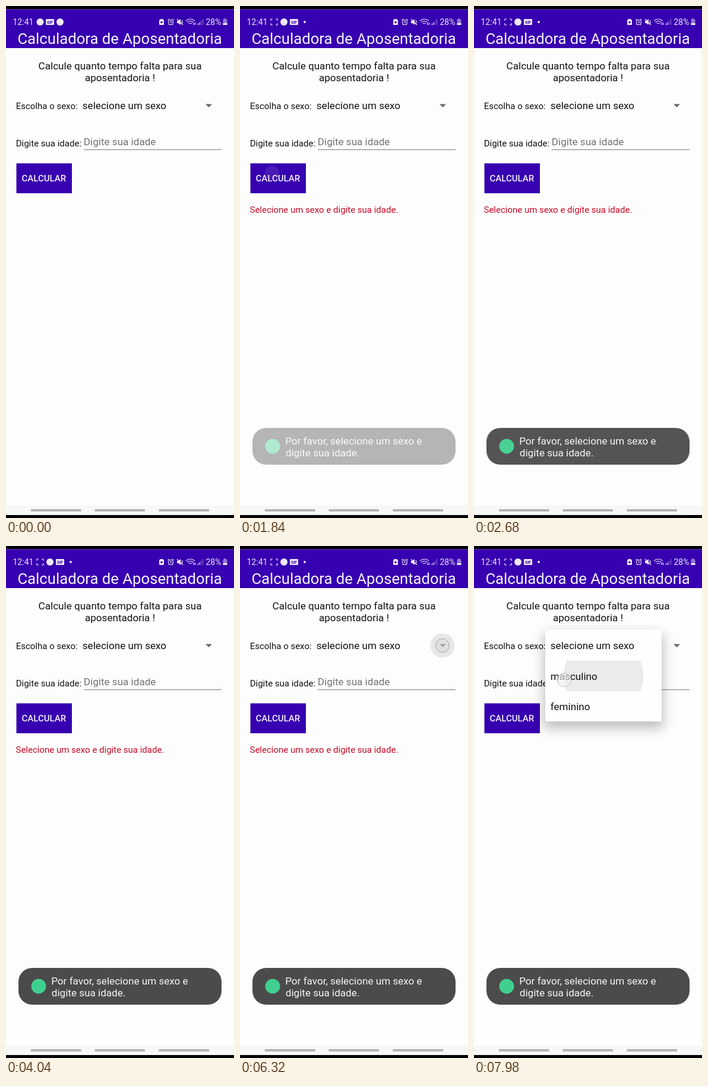
An HTML page that plays this animation: 384x864 px, repeating every 8 s.

```html
<!DOCTYPE html>
<html lang="pt">
<head>
<meta charset="utf-8">
<title>Calculadora de Aposentadoria</title>
<style>
  html, body { margin: 0; width: 100%; height: 100%; overflow: hidden; background: #000; }
  svg { display: block; width: 100vw; height: 100vh; font-family: Roboto, Arial, sans-serif; }
  .body { font-size: 17.1px; }
  .label { font-size: 15px; }
  .status { font-size: 14px; fill: #eee9f6; }
  .mid { text-anchor: middle; }
  .line { fill: none; stroke: #eee9f6; stroke-width: 1.2; }
  .brand { fill: #3700b0; }
  #popup { transform-origin: 316px 141px; }
</style>
</head>
<body>
<svg viewBox="0 0 384 864">
  <defs>
    <clipPath id="row"><rect x="120" y="193" width="196" height="51.5"/></clipPath>
    <filter id="soft" x="-30%" y="-30%" width="160%" height="160%"><feGaussianBlur stdDeviation="10"/></filter>
    <filter id="edge" x="-30%" y="-30%" width="160%" height="160%"><feGaussianBlur stdDeviation="0.7"/></filter>
  </defs>

  <rect width="384" height="864" fill="#000"/>
  <rect y="5.5" width="384" height="853.5" fill="#fdfdfd"/>
  <rect y="843" width="384" height="16" fill="#f7f7f7"/>
  <rect class="brand" y="5.5" width="384" height="65.5"/>

  <!-- status bar -->
  <g class="status">
    <text x="11.5" y="32">12:41</text>
    <text x="336.5" y="32">28%</text>
    <g id="iconsA">
      <circle cx="57.5" cy="27" r="6"/>
      <g id="gif">
        <rect x="67" y="22" width="14" height="10" rx="1"/>
        <text x="74" y="29.5" class="mid brand" font-size="6.5" font-weight="700">GIF</text>
      </g>
      <circle cx="91" cy="27" r="6"/>
    </g>
    <g id="iconsB">
      <path class="line" d="M52 25v-3h3M60 22h3v3M63 29v3h-3M55 32h-3v-3"/>
      <rect id="inner" class="line" x="55.5" y="25.3" width="4" height="3.4"/>
      <circle cx="74" cy="27" r="6"/>
      <use href="#gif" x="17"/>
      <circle cx="109" cy="27" r="1.9"/>
    </g>
    <path d="M260 22h4l2 2v7q0 1-1 1h-6q-1 0-1-1v-7z"/>
    <circle class="brand" cx="262" cy="27.5" r="1.8"/>
    <circle class="line" cx="277.5" cy="27.5" r="4" stroke-width="1.5"/>
    <path class="line" d="M277.5 25v3h2M272.5 24l2.5-2M282.5 24l-2.5-2M274 32l1-1M281 32l-1-1"/>
    <path d="M288 25h2.5l3.5-3v10l-3.5-3h-2.5z"/>
    <path class="line" d="M288 22l10 10M296 24q2 3 0 6"/>
    <path class="line" d="M303 25q7.5-6 15 0M305.5 27.5q5-4 10 0M308 30q2.5-2 5 0"/>
    <path class="line" d="M316 28v4M318.5 32v-4" stroke-width=".9"/>
    <path class="line" d="M323.5 32v-2.5M326 32v-4.5"/>
    <path class="line" d="M328.5 32v-7M331.5 32v-10" opacity=".45"/>
    <path d="M367 21h3v1.5h2.5v9.500h-7v-9.500h1.500z" opacity=".5"/>
    <rect x="365.5" y="29" width="7" height="3"/>
  </g>
  <text x="19.4" y="64" font-size="25.7" fill="#f6f3fb">Calculadora de Aposentadoria</text>

  <!-- form -->
  <g fill="#121212">
    <g class="body mid">
      <text x="192" y="107">Calcule quanto tempo falta para sua</text>
      <text x="192" y="127">aposentadoria !</text>
    </g>
    <text class="label" x="16.7" y="174">Escolha o sexo:</text>
    <text class="body" x="128.8" y="174">selecione um sexo</text>
    <text class="label" x="16.7" y="237">Digite sua idade:</text>
  </g>
  <text class="body" x="130.8" y="235" fill="#737373">Digite sua idade</text>
  <rect x="131" y="242" width="232" height="1" fill="#7a7a90"/>
  <circle id="arrowRipple" cx="341" cy="168" r="20.5" fill="#e7e7e7"/>
  <path d="M336 165.5h11l-5.5 5.5z" fill="#68686e"/>
  <rect class="brand" x="17.5" y="265.5" width="93.5" height="50.5"/>
  <text class="label" x="26.5" y="296" font-weight="500" fill="#f6f3fb">CALCULAR</text>
  <text id="error" class="label" x="16.5" y="349" fill="#c40a24">Selecione um sexo e digite sua idade.</text>

  <g id="toast">
    <rect x="21" y="712" width="342" height="62" rx="23" fill="#4b4b4b"/>
    <circle cx="55" cy="743" r="12.5" fill="#40cf8f"/>
    <g class="body" fill="#f7f7f7">
      <text x="76.2" y="740">Por favor, selecione um sexo e</text>
      <text x="76.8" y="760">digite sua idade.</text>
    </g>
  </g>

  <g id="popup">
    <rect x="117" y="148" width="202" height="160" fill="#000" opacity=".24" filter="url(#soft)"/>
    <rect x="120" y="141" width="196" height="155" rx="2" fill="#fefefe"/>
    <g clip-path="url(#row)"><circle id="rowRipple" r="1" fill="#ebebeb"/></g>
    <g class="body" fill="#121212">
      <text x="128.8" y="174">selecione um sexo</text>
      <text x="128.8" y="225.5">masculino</text>
      <text x="128.8" y="277">feminino</text>
    </g>
  </g>

  <g id="tapButton" filter="url(#edge)">
    <circle cx="54" cy="281.5" r="11.5" fill="#d3cdd9" fill-opacity=".9" stroke="#b8a8cc" stroke-width="1.5"/>
  </g>
  <g id="tapArrow">
    <circle cx="341" cy="168" r="11.5" fill="#d9d9d9" fill-opacity=".5" stroke="#a0a0a0"/>
  </g>
  <g id="tapRow">
    <circle cx="152" cy="226" r="11.5" fill="#f0f0f0" fill-opacity=".62" stroke="#bcbcbc"/>
  </g>

  <g fill="#b5b5b5">
    <rect x="41.5" y="849" width="85.5" height="4" rx="2"/>
    <rect x="149" y="849" width="85.5" height="4" rx="2"/>
    <rect x="257" y="849" width="85.5" height="4" rx="2"/>
  </g>
</svg>

<script>
  const LOOP = 8000;
  const start = document.timeline.currentTime || 0;

  // steps: [ms, value] pairs; first and last values are held to the loop ends
  function track(id, prop, steps, easing = 'linear') {
    const all = [[0, steps[0][1]], ...steps, [LOOP, steps[steps.length - 1][1]]];
    const frames = all.map(([ms, value]) => ({ offset: ms / LOOP, [prop]: value, easing }));
    const anim = document.getElementById(id).animate(frames, { duration: LOOP, iterations: Infinity });
    anim.startTime = start;
  }
  const fade = (id, ...steps) => track(id, 'opacity', steps);
  const toggle = (id, ...steps) => track(id, 'opacity', steps, 'step-end');

  toggle('iconsA', [0, 1], [280, 0]);
  toggle('iconsB', [0, 0], [280, 1]);
  toggle('inner', [0, 1], [1300, 0], [3360, 1], [4040, 0], [6500, 1], [7420, 0]);
  toggle('error', [0, 0], [1280, 1], [7420, 0]);

  fade('tapButton', [420, 0], [640, 1], [1240, 1], [1840, .14], [1980, 0]);
  fade('toast', [1500, 0], [1840, .4], [2200, .8], [2680, .95], [3080, 1]);
  fade('tapArrow', [5760, 0], [5960, 1], [6360, 1], [6700, 0]);
  fade('arrowRipple', [5800, 0], [6100, 1], [6740, 1], [7000, 0]);
  fade('popup', [6380, 0], [6520, 1]);
  track('popup', 'transform', [[6380, 'scale(.92)'], [6560, 'scale(.985)'], [6700, 'scale(1)']]);
  fade('tapRow', [7820, 0], [7940, 1]);
  fade('rowRipple', [7840, 0], [7900, 1]);
  track('rowRipple', 'transform', [[7840, 'translate(158px, 225px) scale(20)'],
    [7980, 'translate(218px, 219px) scale(67)']]);
</script>
</body>
</html>
```
